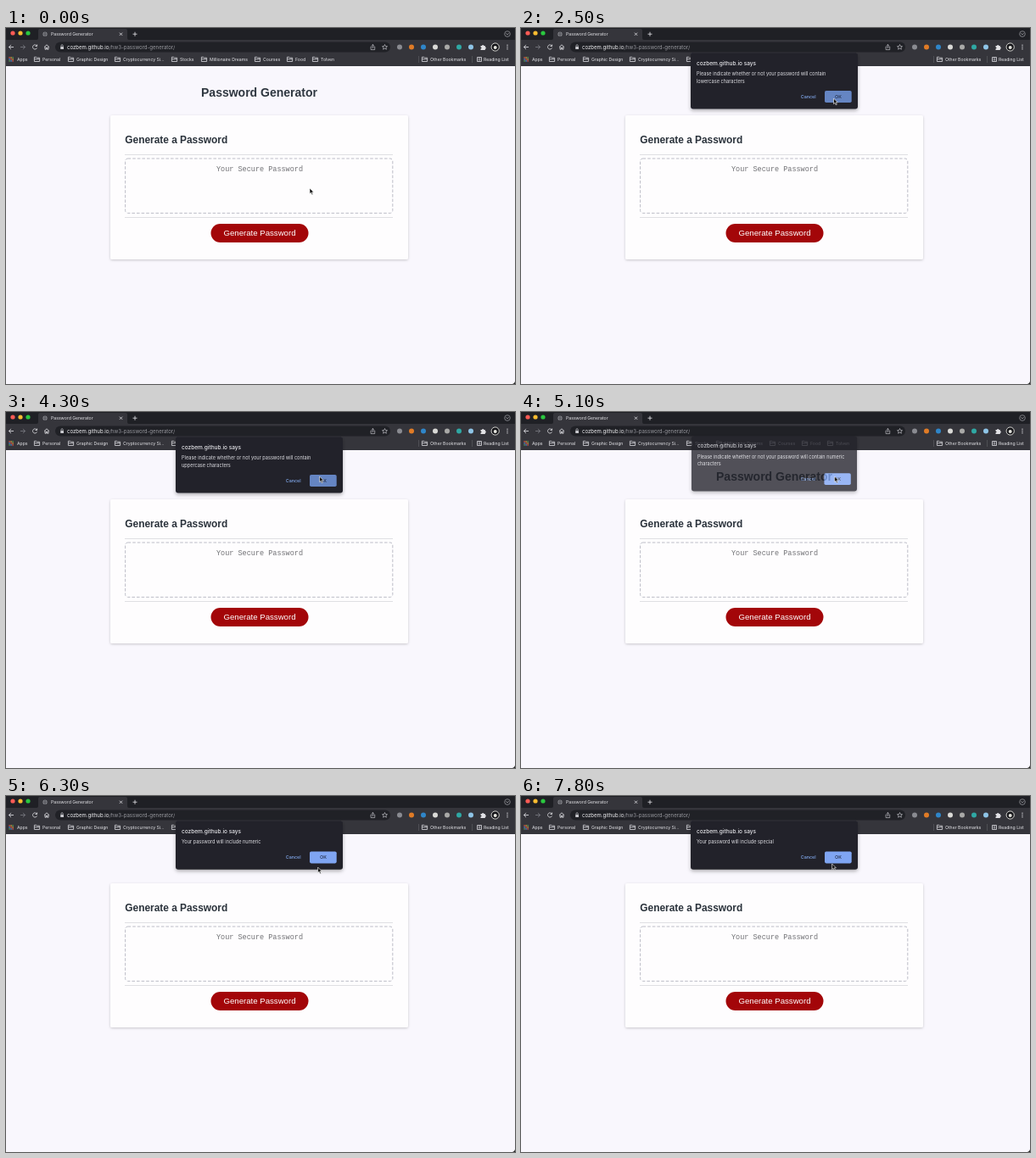
Recreate the animation shown at these times as an HTML page. Size 600x420 px, loop 8000 ms.

```html
<!DOCTYPE html>
<html lang="en">
<head>
<meta charset="utf-8">
<title>Password Generator</title>
<style>
html, body { margin: 0; width: 100%; height: 100%; overflow: hidden; background: #f9f7fd; }
svg { display: block; width: 600px; height: 420px; }
text { font-family: Inter, Roboto, sans-serif; white-space: pre; }
.page text { font-family: "Liberation Sans", Arial, sans-serif; }
.page .mono { font-family: "Liberation Mono", monospace; }
.line { fill: none; stroke: #dcdce0; stroke-width: .9; }
.bar text { fill: #e6e6ea; font-size: 5.15px; }
</style>
</head>
<body>
<svg viewBox="0 0 600 420">
  <defs>
    <filter id="soft" x="-20%" y="-20%" width="140%" height="150%">
      <feDropShadow dx="0" dy="1" stdDeviation="1.6" flood-color="#000" flood-opacity=".2"/>
    </filter>
    <filter id="deep" x="-20%" y="-20%" width="140%" height="150%">
      <feDropShadow dx="0" dy="2" stdDeviation="2" flood-color="#000" flood-opacity=".3"/>
    </filter>
    <path id="folder" d="M0 .6h2.3l.8 .9h3.1v4.3h-6.2zM0 3h6.2" class="line" style="stroke:#c9c9ce"/>
  </defs>

  <g class="page">
    <rect width="600" height="420" fill="#f9f7fd"/>
    <text x="298.5" y="80.6" font-size="14" font-weight="700" text-anchor="middle" fill="#2f3740">Password Generator</text>
    <rect x="123" y="103" width="351" height="170" rx="2" fill="#fefdfe" filter="url(#soft)"/>
    <text x="140.3" y="136" font-size="11.9" font-weight="700" fill="#2a323b">Generate a Password</text>
    <path d="M140 149.5h316M140 223.5h316" class="line"/>
    <rect x="140.6" y="154" width="315.2" height="64.4" rx="3" fill="none" stroke="#bcbdc7" stroke-dasharray="3.6 2"/>
    <text class="mono" x="248" y="169.3" font-size="8.5" fill="#707074">Your Secure Password</text>
    <rect x="241.5" y="231" width="115" height="22" rx="11" fill="#a30609"/>
    <text x="299" y="245.2" font-size="9.65" text-anchor="middle" fill="#fff">Generate Password</text>
    <path d="M600 417v3h-3q2.5 -.5 3 -3" fill="#222"/>
  </g>

  <g class="bar">
    <rect width="600" height="45" fill="#35353b"/>
    <path d="M0 0H600V14H145q-2 0 -2 -2V3q0 -2 -2 -2H40q-2 0 -2 2v9q0 2 -2 2H0z" fill="#1f2025"/>
    <circle cx="8" cy="6" r="2.6" fill="#fc5b55"/>
    <circle cx="17" cy="6" r="2.6" fill="#fcbc30"/>
    <circle cx="26" cy="6" r="2.6" fill="#2ac83f"/>
    <circle cx="46" cy="7.2" r="2.6" fill="#8b8c92"/>
    <path d="M43.5 7.2h5M46 4.7q-2 2.5 0 5q2 -2.5 0 -5" fill="none" stroke="#35353b" stroke-width=".5"/>
    <text x="53" y="9.1">Password Generator</text>
    <g fill="none" stroke="#d5d5da" stroke-width=".9">
      <path d="M133.9 5.6l3.2 3.2m0 -3.2l-3.2 3.2M149.5 7.2h5m-2.5 -2.5v5"/>
      <circle cx="591" cy="7" r="3.3" stroke="#85868c"/>
      <path d="M589.5 6.3l1.5 1.5l1.5 -1.5" stroke-width=".7"/>
      <path d="M9 22.5h-5.6m2.6 -2.6l-2.6 2.6l2.6 2.6"/>
      <path d="M17 22.5h5.6m-2.6 -2.6l2.6 2.6l-2.6 2.6" stroke="#77787e"/>
      <path d="M36.3 21a2.6 2.6 0 1 0 .2 2.5M36.6 19.5v2h-2"/>
      <path d="M45 22.6l3 -2.8l3 2.8M46 22v3.2h1.4v-2h1.2v2h1.4v-3.2"/>
    </g>
    <rect x="58" y="16.5" width="395" height="12" rx="6" fill="#202126"/>
    <rect x="64.2" y="22" width="3.8" height="3" rx=".5" fill="#c9c9ce"/>
    <path d="M65 22v-1.2a1.1 1.1 0 0 1 2.2 0v1.2" fill="none" stroke="#c9c9ce" stroke-width=".7"/>
    <text x="72" y="24.7" style="font-size:6.05px;fill:#f0f0f3">cozbem.github.io<tspan fill="#96979d">/hw3-password-generator/</tspan></text>
    <g fill="none" stroke="#c0c0c6" stroke-width=".7">
      <path d="M431.4 22h-1.3v3.6h4.6v-3.6h-1.3M432.4 24v-4.6m-1.3 1.3l1.3 -1.3l1.3 1.3"/>
      <path d="M446.5 19.5l.9 2l2.1 .2l-1.6 1.4l.5 2.1l-1.9 -1.1l-1.9 1.1l.5 -2.1l-1.6 -1.4l2.1 -.2z"/>
    </g>
    <g id="addons"></g>
    <path d="M559.5 21h1.6a1.1 1.1 0 0 1 2.2 0h1.5v1.5a1.1 1.1 0 0 1 0 2.2v1.2h-5.3v-1.4a1 1 0 0 0 0 -2z" fill="#e2e2e6"/>
    <circle cx="576.7" cy="22.5" r="4.6" fill="#141418" stroke="#d8d8d4" stroke-width="1"/>
    <circle cx="576.7" cy="23" r="2" fill="#e4e4de"/>
    <g fill="#d5d5da"><circle cx="591" cy="20.3" r=".7"/><circle cx="591" cy="22.5" r=".7"/><circle cx="591" cy="24.7" r=".7"/></g>
    <g id="marks"></g>
    <path d="M486.5 33v8M549.5 33v8" stroke="#5a5b61" stroke-width=".7"/>
    <path d="M555.5 34.5h5v5h-5zM556.7 36h2.6M556.7 37.8h2.6" class="line" style="stroke:#c9c9ce"/>
    <text x="563" y="38.8">Reading List</text>
  </g>

  <g id="dialog">
    <rect id="panel" x="200" y="29.5" width="197" rx="3" fill="#222229" filter="url(#deep)"/>
    <text x="207" y="43.8" font-size="6.5" font-weight="500" fill="#e8e8ec">cozbem.github.io says</text>
    <g font-size="5.6" fill="#dedee3">
      <text id="line1" x="207" y="56.2"></text>
      <text id="line2" x="207" y="64.7"></text>
    </g>
    <g id="buttons" font-size="5.4" font-weight="500" text-anchor="middle">
      <text x="338.7" y="9" fill="#83abf0">Cancel</text>
      <rect id="ok" x="358" width="31.7" height="14" rx="1.8"/>
      <text x="374" y="9" fill="#25304a">OK</text>
    </g>
  </g>

  <g id="cursor" stroke-linejoin="round">
    <path id="arrow" d="M0 0v6.6l1.5 -1.4l1.1 2.5l1.2 -.5l-1.1 -2.4h2.1z" fill="#111" stroke="#fff" stroke-width=".6"/>
    <path id="hand" d="M1.6 .6q.7 -.6 1.1 .1v2l2.6 .6q.7 .3 .5 1.2l-.6 2.3h-2.8l-2 -2.4q.3 -.8 1.2 -.1z" fill="#e9f3f6" stroke="#35525e" stroke-width=".5"/>
  </g>
</svg>
<script>
const $ = id => document.getElementById(id);
const set = (id, attrs) => { for (const k in attrs) $(id).setAttribute(k, attrs[k]); };

const bookmarks = [["Personal", 43], ["Graphic Design", 83], ["Cryptocurrency Si...", 138], ["Stocks", 205],
  ["Millionaire Dreams", 240], ["Courses", 303], ["Food", 341], ["Tolven", 371], ["Other Bookmarks", 500]];
const dots = ["#e8564b", "#e8a33c", "#5aa65c", "#4d8fe0"];
$("marks").innerHTML = '<text x="13" y="38.8">Apps</text>' +
  [...Array(9).keys()].map(i =>
    `<rect x="${3.4 + i % 3 * 2}" y="${34.2 + (i / 3 | 0) * 2}" width="1.4" height="1.4" fill="${dots[i % 4]}"/>`).join("") +
  bookmarks.map(([name, x]) =>
    `<use href="#folder" x="${x - 9.6}" y="33.7"/><text x="${x}" y="38.8">${name}</text>`).join("");

$("addons").innerHTML = ["#8a8b91", "#e07b26", "#2f86c9", "#d9d9d6", "#a9a9a7", "#2fa8a4", "#8ec4e6"]
  .map((c, i) => `<circle cx="${464 + i * 14}" cy="22.5" r="3" fill="${c}"/>`).join("");

// kind, asks (two lines) or confirms (one line), opens, button darkens, closes
const dialogs = [
  ["lowercase", true, 1100, 2400, 2700],
  ["lowercase", false, 2900, 3500, 3700],
  ["uppercase", true, 3900, 4100, 4400],
  ["uppercase", false, 4500, 4900, 4900],
  ["numeric", true, 5100, 5500, 5600],
  ["numeric", false, 5800, 6700, 6900],
  ["special", true, 7100, 7400, 7500],
  ["special", false, 7700, 9000, 9000]
];

// time, x, y of the pointer
const path = [[0, 358, 189], [100, 358, 189], [700, 283.5, 239], [1400, 283.5, 239], [2300, 370, 84.5],
  [2500, 368.5, 83], [3100, 368.5, 83], [3500, 369.6, 76], [5700, 369.6, 76], [6300, 367.6, 84],
  [6400, 367.6, 84], [6800, 369.6, 76], [7400, 369.6, 76], [7800, 366.6, 80], [8000, 366.6, 80]];

function pointer(t) {
  const i = path.findIndex(p => p[0] > t);
  const [t0, x0, y0] = path[i - 1], [t1, x1, y1] = path[i];
  const u = (t - t0) / (t1 - t0), e = u * u * (3 - 2 * u);
  return [x0 + (x1 - x0) * e, y0 + (y1 - y0) * e];
}

function drawDialog(t) {
  const d = dialogs.find(d => t >= d[2] && t < d[4] + 100);
  $("dialog").style.display = d ? "" : "none";
  if (!d) return;
  const [kind, asks, opens, dark, closes] = d;
  const fading = t < opens + 100 || t >= closes;
  const wide = kind === "numeric" || kind === "special";
  $("line1").textContent = asks
    ? "Please indicate whether or not your password will contain" + (wide ? " " + kind : "")
    : "Your password will include " + kind;
  $("line2").textContent = !asks ? "" : wide ? "characters" : kind + " characters";
  set("panel", { height: asks ? 66 : 57.3 });
  set("buttons", { transform: `translate(0 ${asks ? 74 : 65.4})` });
  set("ok", { fill: t >= dark ? "#6585c3" : "#7fa5f2" });
  set("dialog", {
    opacity: t < opens + 100 ? .78 : t >= closes ? .5 : 1,
    transform: fading ? "translate(2.99 -1) scale(.99)" : ""
  });
}

function draw(now) {
  const t = Math.floor(now % 8000 / 100) * 100;
  const [x, y] = pointer(t), hand = t >= 700 && t < 1500;
  drawDialog(t);
  set("cursor", { transform: `translate(${x} ${y})` });
  $("hand").style.display = hand ? "" : "none";
  $("arrow").style.display = hand ? "none" : "";
}

let start;
function tick(now) {
  start ??= now;
  draw(now - start);
  requestAnimationFrame(tick);
}
draw(0);
requestAnimationFrame(tick);
</script>
</body>
</html>
```
